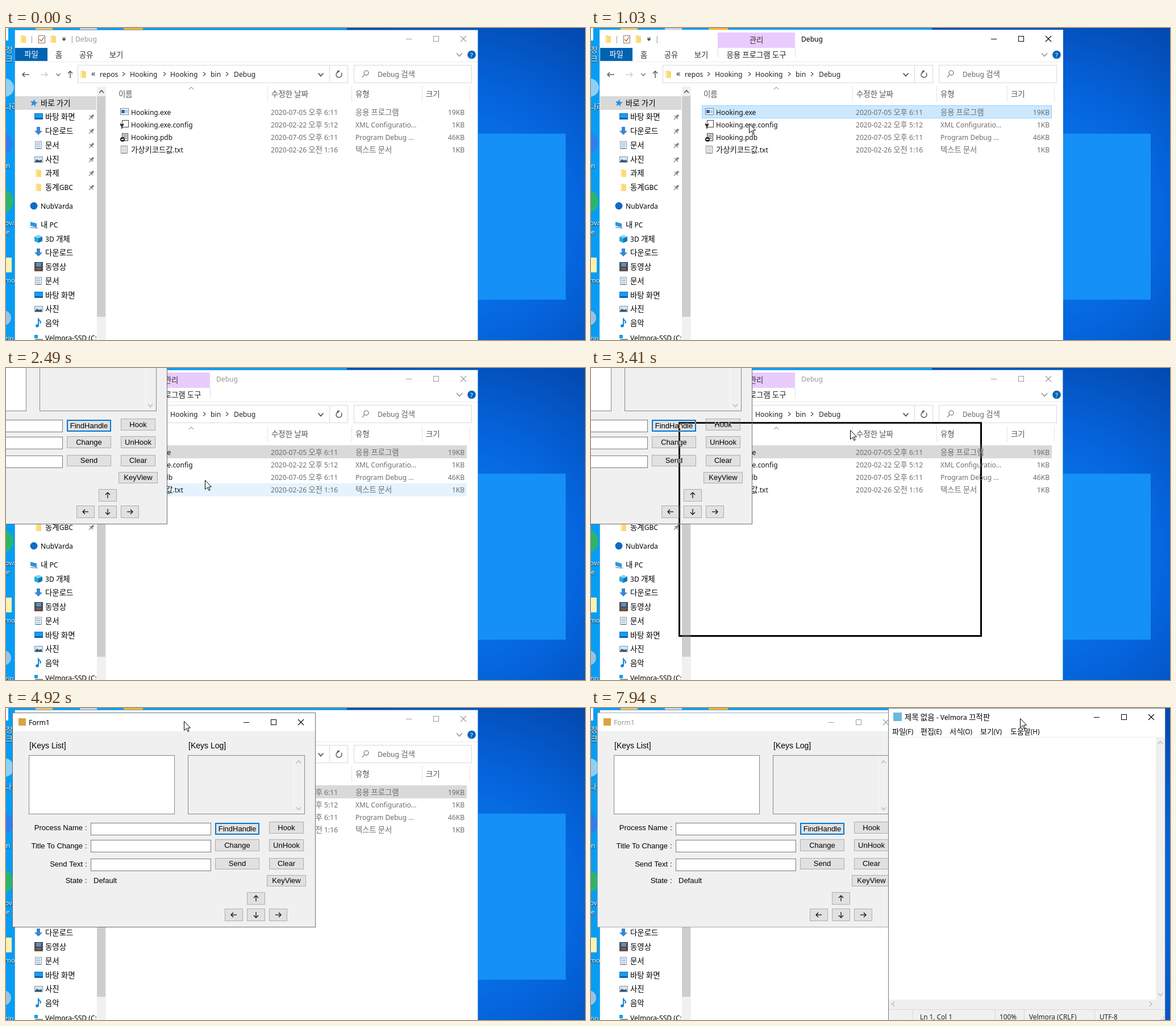
An HTML page with a canvas that plays this animation: 1019 by 549 pixels, repeating every 8000 ms.

```html
<!DOCTYPE html>
<html lang="ko">
<head>
<meta charset="utf-8">
<style>
html, body { margin: 0; width: 100%; height: 100%; overflow: hidden; background: #0467d8; }
canvas { display: block; }
</style>
</head>
<body>
<canvas id="stage" width="1019" height="549"></canvas>
<script>
const W = 1019, H = 549, LOOP = 8000;
const c = document.getElementById('stage').getContext('2d');
const UI = '"Noto Sans", "Open Sans", sans-serif';
const KO = '"Noto Sans CJK KR", "Noto Sans CJK", sans-serif';
const FORM = '"Liberation Sans", Arial, sans-serif';
const BLUE = '#0078d7';

// ---------- helpers ----------
function rect(x, y, w, h, fill) { c.fillStyle = fill; c.fillRect(x, y, w, h); }
function box(x, y, w, h, fill, edge, t = 1) {
  rect(x, y, w, h, edge);
  rect(x + t, y + t, w - 2 * t, h - 2 * t, fill);
}
function disc(x, y, r, fill) {
  c.fillStyle = fill; c.beginPath(); c.arc(x, y, r, 0, 7); c.fill();
}
function line(color, width, ...p) {
  c.strokeStyle = color; c.lineWidth = width; c.beginPath();
  for (let i = 0; i < p.length; i += 2) c.lineTo(p[i], p[i + 1]);
  c.stroke();
}
function poly(fill, ...p) {
  c.fillStyle = fill; c.beginPath();
  for (let i = 0; i < p.length; i += 2) c.lineTo(p[i], p[i + 1]);
  c.fill();
}
// Hangul runs are set a little larger than Latin ones; y is the optical middle.
function text(s, x, y, color = '#000', align = 0, size = 12.1) {
  const runs = s.split(/([\uac00-\ud7a3]+)/).filter(Boolean).map(r => {
    const font = /[\uac00-\ud7a3]/.test(r) ? `${size * 1.11}px ${KO}` : `${size}px ${UI}`;
    c.font = font;
    return { r, font, w: c.measureText(r).width };
  });
  x -= align * runs.reduce((a, b) => a + b.w, 0);
  c.fillStyle = color; c.textAlign = 'left';
  for (const { r, font, w } of runs) { c.font = font; c.fillText(r, x, y + 4.5); x += w; }
}
function label(s, x, y, align = 'left', size = 13) {
  c.font = `${size}px ${FORM}`; c.fillStyle = '#000'; c.textAlign = align;
  c.fillText(s, x, y + 4.5);
}
function chevron(x, y, dir, color = '#555', r = 4, w = 1.3) {
  const h = r * .55, q = { u: [-r, h, 0, -h, r, h], d: [-r, -h, 0, h, r, -h],
    l: [h, -r, -h, 0, h, r], r: [-h, -r, h, 0, -h, r] }[dir];
  line(color, w, ...q.map((v, i) => v + (i % 2 ? y : x)));
}
function arrow(x, y, dir, color, r = 6, w = 1.3) {
  const a = { r: 0, d: 1, l: 2, u: 3 }[dir] * Math.PI / 2;
  c.save(); c.translate(x, y); c.rotate(a);
  line(color, w, -r, 0, r, 0);
  line(color, w, r - 4, -4, r, 0, r - 4, 4);
  c.restore();
}
function frameButtons(x, y, gap, color) {
  rect(x - 5, y, 10, 1, color);
  c.strokeStyle = color; c.lineWidth = 1;
  c.strokeRect(x + gap - 4.5, y - 4.5, 9, 9);
  const k = x + 2 * gap;
  line(color, 1.1, k - 5, y - 5, k + 5, y + 5);
  line(color, 1.1, k + 5, y - 5, k - 5, y + 5);
}
// Linear motion through [time, x, y] points.
function along(t, pts) {
  if (t <= pts[0][0]) return pts[0].slice(1);
  for (let i = 1; i < pts.length; i++) {
    const [t0, x0, y0] = pts[i - 1], [t1, x1, y1] = pts[i];
    if (t < t1) {
      const k = (t - t0) / (t1 - t0);
      return [x0 + (x1 - x0) * k, y0 + (y1 - y0) * k];
    }
  }
  return pts[pts.length - 1].slice(1);
}
const clamp = v => Math.max(0, Math.min(1, v));

// ---------- icons, each about 15 px around its middle ----------
const icon = {
  folder(x, y) {
    rect(x - 5, y - 6, 5, 12, '#f0c24f'); rect(x - 4, y - 5, 9, 12, '#fbd978');
    rect(x - 5, y - 6, 3, 13, '#ffe9a6');
  },
  star(x, y) {
    const p = [];
    for (let i = 0; i < 10; i++) {
      const r = i % 2 ? 3 : 7, a = i * Math.PI / 5 - 1.4;
      p.push(x + r * Math.cos(a), y + r * Math.sin(a));
    }
    poly('#2a8fe0', ...p);
  },
  desk(x, y) {
    box(x - 7, y - 6, 15, 11, '#1c9cf0', '#0f6fc0'); rect(x - 6, y + 2, 13, 2, '#0b5ea8');
  },
  down(x, y) {
    poly('#3a86d0', x - 3, y - 7, x + 3, y - 7, x + 3, y, x + 7, y, x, y + 7, x - 7, y, x - 3, y);
  },
  doc(x, y) {
    box(x - 6, y - 7, 12, 14, '#fff', '#8b98a5');
    for (let i = 0; i < 4; i++) rect(x - 4, y - 4 + 3 * i, 8, 1, i < 2 ? '#3f8fd0' : '#7e8f9e');
  },
  photo(x, y) {
    box(x - 7, y - 5, 15, 11, '#cfe6f7', '#8b98a5');
    poly('#35566e', x - 6, y + 4, x - 3, y, x + 1, y + 2, x + 6, y + 1, x + 6, y + 5, x - 6, y + 5);
  },
  cube(x, y) {
    poly('#7fd6f2', x, y - 7, x + 7, y - 4, x, y - 1, x - 7, y - 4);
    poly('#22a7dd', x - 7, y - 4, x, y - 1, x, y + 7, x - 7, y + 4);
    poly('#0f78b5', x + 7, y - 4, x, y - 1, x, y + 7, x + 7, y + 4);
  },
  film(x, y) {
    rect(x - 7, y - 8, 15, 16, '#333'); rect(x - 4, y - 7, 9, 7, '#5a8fc4'); rect(x - 4, y + 1, 9, 6, '#7a5a50');
    for (let i = 0; i < 5; i++) { rect(x - 6, y - 6 + 3 * i, 1, 1, '#fff'); rect(x + 6, y - 6 + 3 * i, 1, 1, '#fff'); }
  },
  note(x, y) {
    line('#1687d9', 2, x, y + 5, x, y - 7, x + 4, y - 2, x + 3, y + 1);
    disc(x - 2, y + 5, 2.8, '#1687d9');
  },
  pc(x, y) {
    poly('#2d95dc', x - 6, y - 5, x + 5, y - 2, x + 5, y + 5, x - 6, y + 2);
    line('#8a9aa8', 1.5, x - 6, y + 5, x + 7, y + 6);
  },
  drive(x, y) { rect(x - 7, y - 5, 6, 6, '#12a0ea'); rect(x - 6, y + 2, 14, 4, '#8b949c'); },
  cloud(x, y) { disc(x, y, 6.5, '#0f6cc4'); }
};
function pin(x, y) {
  line('#7d868e', 3.5, x - 1, y + 1, x + 3, y - 3);
  line('#7d868e', 1.2, x - 4, y - 2, x + 2, y + 4);
  line('#7d868e', 1.2, x - 5, y + 5, x, y);
}

// ---------- desktop ----------
function desktop() {
  rect(0, 0, W, H, '#079df4');
  const g = c.createRadialGradient(800, 330, 40, 800, 330, 400);
  g.addColorStop(0, '#0a7cf0'); g.addColorStop(.5, '#0564dc'); g.addColorStop(1, '#0347ac');
  rect(600, 0, W - 600, H, g);
  rect(693, 186, 292, 292, '#1590f6');
  rect(0, 0, 4, 22, '#fff');
  disc(-2, 105, 16, '#8fd0f5');
  disc(-8, 203, 20, '#2f7ff0');
  disc(-8, 305, 21, '#2cb56a');
  rect(0, 404, 10, 26, '#fff1b0');
  disc(-4, 510, 13, '#9cc3dd');
  [['장', 38], ['크', 54], ['나리', 138], ['n', 241], ['ova', 342], ['e', 358], ['mo_', 443], ['zip', 545]]
    .forEach(([s, y], i) => {
      c.shadowColor = '#000'; c.shadowBlur = 2; c.shadowOffsetY = 1;
      text(s, i === 2 || i === 4 || i > 5 ? -2 : 0, y, '#fff', 0, 11.5);
      c.shadowColor = 'transparent';
    });
  rect(52, 0, 30, 4, '#e8c56a'); rect(130, 0, 30, 4, '#c9d3da'); rect(207, 0, 34, 4, '#efb62f');
}

// ---------- file browser ----------
const NAV = [
  ['star', '바로 가기', 132, 0], ['desk', '바탕 화면', 156, 2], ['down', '다운로드', 181, 2],
  ['doc', '문서', 206, 2], ['photo', '사진', 231, 2], ['folder', '과제', 255, 2], ['folder', '동계GBC', 280, 2],
  ['cloud', 'NubVarda', 313, 0], ['pc', '내 PC', 346, 0], ['cube', '3D 개체', 371, 1],
  ['down', '다운로드', 395, 1], ['film', '동영상', 420, 1], ['doc', '문서', 445, 1],
  ['desk', '바탕 화면', 470, 1], ['photo', '사진', 494, 1], ['note', '음악', 519, 1], ['drive', 'Velmora-SSD (C:)', 545, 1]
];
const FILES = [
  ['Hooking.exe', '2020-07-05 오후 6:11', '응용 프로그램', '19KB'],
  ['Hooking.exe.config', '2020-02-22 오후 5:12', 'XML Configuratio...', '1KB'],
  ['Hooking.pdb', '2020-07-05 오후 6:11', 'Program Debug ...', '46KB'],
  ['가상키코드값.txt', '2020-02-26 오전 1:16', '텍스트 문서', '1KB']
];
const rowTop = i => Math.round(136 + 22.4 * i);

function fileIcon(i, x, y) {
  if (i === 0) {
    box(x - 7, y - 6, 15, 12, '#fff', '#6f7f8c'); rect(x - 5, y - 3, 6, 6, '#1d6fc4'); rect(x + 2, y - 3, 4, 6, '#b9c8d5');
  } else if (i === 1) {
    box(x - 4, y - 7, 12, 13, '#fff', '#444');
    disc(x - 4, y + 1, 3, '#333'); rect(x - 5, y + 2, 2, 6, '#333'); rect(x - 5, y - 2, 2, 2, '#fff');
  } else if (i === 2) {
    box(x - 4, y - 7, 11, 14, '#e8e8e8', '#444');
    for (let k = 0; k < 3; k++) rect(x - 2, y - 4 + 3 * k, 7, 1, '#555');
    disc(x - 3, y + 4, 4, '#222'); rect(x - 5, y + 3, 4, 2, '#fff');
  } else {
    box(x - 6, y - 7, 12, 14, '#fff', '#8a8a8a');
    for (let k = 0; k < 5; k++) rect(x - 4, y - 5 + 2.5 * k, 8, 1, '#aaa');
  }
}

function browser(active, picked, hover) {
  box(15, 3, 816, 560, '#fff', active ? '#e8eef4' : '#5fa6da');
  const ink = active ? '#000' : '#999';
  icon.folder(30, 19);
  text('|', 42, 19, '#888'); text('|', 113, 19, '#888');
  box(57, 13, 12, 14, '#fff', '#777'); line('#d5762a', 1.6, 59, 20, 62, 23, 67, 16);
  icon.folder(83, 19);
  rect(99, 17, 6, 1, '#333'); poly('#333', 98.5, 19, 105.5, 19, 102, 23);
  if (picked) {
    rect(223, 8, 136, 27, '#e9cbfd');
    text('관리', 291, 21, '#333', .5);
    text('응용 프로그램 도구', 291, 47, '#222', .5);
    rect(223, 35, 1, 18, '#e0e0e0'); rect(359, 35, 1, 18, '#e0e0e0');
  }
  text('Debug', picked ? 370 : 122, 19, ink);
  frameButtons(709, 19, 48, ink);

  rect(16, 35, 57, 23, '#0063b1');
  text('파일', 44.5, 46, '#fff', .5);
  [['홈', 93], ['공유', 141], ['보기', 194]].forEach(([s, x]) => text(s, x, 47, '#333', .5));
  chevron(798, 47, 'd', '#888', 5);
  disc(819.5, 47, 7.3, '#0064b8'); text('?', 819.5, 47, '#fff', .5, 11);
  rect(16, 59, 814, 1, '#ececec');

  arrow(35, 82, 'l', '#444'); arrow(67, 82, 'r', '#c8c8c8');
  chevron(92, 82, 'd', '#666', 3.5); arrow(113, 82, 'u', '#444');
  box(126, 65, 476, 32, '#fff', '#d9d9d9'); rect(569, 65, 1, 32, '#d9d9d9');
  icon.folder(136, 81);
  text('«', 150, 80, '#222', 0, 14);
  [['repos', 165, 207], ['Hooking', 218, 279], ['Hooking', 289, 349], ['bin', 360, 389], ['Debug', 401]]
    .forEach(([s, x, next]) => { text(s, x, 81, '#222', 0, 12.2); if (next) chevron(next, 81, 'r', '#555', 3.5); });
  chevron(554, 82, 'd', '#444', 4.5, 1.6);
  c.strokeStyle = '#555'; c.lineWidth = 1.4;
  c.beginPath(); c.arc(586, 82, 5, -.7, 4.2); c.stroke();
  poly('#555', 583, 75, 588, 75, 583, 80);
  box(612, 65, 208, 32, '#fff', '#d9d9d9');
  c.strokeStyle = '#666'; c.lineWidth = 1.1;
  c.beginPath(); c.arc(634, 79, 4, 0, 7); c.stroke();
  line('#666', 1.2, 631, 82, 627, 87);
  text('Debug 검색', 654, 81, '#666');

  rect(16, 120, 143, 24, '#d9d9d9');
  c.save(); c.beginPath(); c.rect(16, 100, 143, 449); c.clip();
  for (const [name, s, y, level] of NAV) {
    icon[name](level ? 57 : 49, y);
    text(s, level ? 69 : 61, y, '#000');
    if (level === 2) pin(151, y);
  }
  c.restore();
  rect(160, 103, 16, 446, '#f0f0f0'); rect(160, 120, 15, 388, '#cdcdcd');
  chevron(168, 112, 'u', '#555', 4, 1.6);

  [['이름', 198], ['수정한 날짜', 467], ['유형', 615], ['크기', 739]].forEach(([s, x]) => text(s, x, 116, '#555'));
  chevron(326, 106, 'u', '#777', 4, 1);
  [460, 608, 732, 815].forEach(x => rect(x, 102, 1, 28, '#e5e5e5'));
  if (hover >= 0) rect(195, rowTop(hover), 616, 23, '#e5f3ff');
  if (picked) {
    if (active) box(195, 136, 616, 23, '#cce8ff', '#99d1ff');
    else rect(195, 136, 616, 23, '#d9d9d9');
  }
  FILES.forEach(([name, date, kind, size], i) => {
    const y = 148 + 22.3 * i;
    fileIcon(i, 208, Math.round(y) - 1);
    text(name, 220, y, '#111', 0, 12);
    text(date, 466, y, '#6d6d6d');
    text(kind, 615, y, '#6d6d6d', 0, 12);
    text(size, 807, y, '#6d6d6d', 1);
  });
}

// ---------- form ----------
const HOME = [11, 8], SIZE = [534, 378];
function button(s, x, y, w, h, focus) {
  box(x, y, w, h, '#e1e1e1', focus ? BLUE : '#adadad', focus ? 2 : 1);
  const dir = { '↑': 'u', '↓': 'd', '←': 'l', '→': 'r' }[s];
  if (dir) arrow(x + w / 2, y + h / 2, dir, '#000', 5, 1.2);
  else label(s, x + w / 2, y + h / 2 - .5, 'center');
}
function form([x, y], active) {
  c.save();
  c.translate(x - HOME[0], y - HOME[1]);
  box(...HOME, ...SIZE, '#f0f0f0', active ? '#707070' : '#aaa');
  rect(12, 9, 532, 32, '#fff');
  rect(22, 18, 13, 13, '#d9a441');
  const ink = active ? '#000' : '#999';
  text('Form1', 40, 25, ink);
  frameButtons(423, 25, 48, ink);
  label('[Keys List]', 41, 66, 'left', 14); label('[Keys Log]', 321, 66, 'left', 14);
  box(40, 83, 257, 104, '#fff', '#828790');
  box(320, 83, 206, 104, '#f0f0f0', '#828790');
  rect(506, 84, 1, 102, '#fafafa');
  chevron(515, 95, 'u', '#bcbcbc', 4, 1.6); chevron(515, 177, 'd', '#bcbcbc', 4, 1.6);
  [['Process Name', 210], ['Title To Change', 242], ['Send Text', 274], ['State', 303]].forEach(([s, ly]) => {
    label(s, 135, ly, 'right'); label(':', 139, ly);
  });
  label('Default', 154, 303);
  [202, 232, 265].forEach(iy => box(149, iy, 212, 22, '#fff', '#7a7a7a'));
  button('FindHandle', 368, 202, 78, 21, true);
  button('Change', 368, 231, 78, 21); button('Send', 368, 264, 78, 20);
  button('Hook', 463, 200, 61, 21); button('UnHook', 463, 231, 61, 21);
  button('Clear', 463, 264, 61, 20); button('KeyView', 459, 294, 69, 20);
  button('↑', 424, 324, 32, 22); button('←', 385, 353, 32, 22);
  button('↓', 424, 353, 32, 22); button('→', 463, 353, 32, 22);
  c.restore();
}

// ---------- text editor ----------
function editor([x, y], caret) {
  c.save();
  c.translate(x - 523, y);
  box(523, 0, 488, 600, '#fff', '#6f7d8a');
  rect(532, 8, 15, 15, '#6cb8dc');
  text('제목 없음 - Velmora 끄적판', 552, 16);
  frameButtons(890, 16, 48, '#000');
  [['파일(F)', 530], ['편집(E)', 580], ['서식(O)', 631], ['보기(V)', 685], ['도움말(H)', 738]]
    .forEach(([s, mx]) => text(s, mx, 41, '#000', 0, 11.7));
  rect(524, 51, 486, 1, '#f0f0f0');
  rect(994, 52, 16, 462, '#f0f0f0'); rect(524, 513, 486, 18, '#f0f0f0');
  chevron(1002, 61, 'u', '#bcbcbc', 4, 1.6); chevron(1002, 504, 'd', '#bcbcbc', 4, 1.6);
  chevron(532, 521, 'l', '#bcbcbc', 4, 1.6); chevron(985, 521, 'r', '#bcbcbc', 4, 1.6);
  rect(524, 530, 486, 69, '#f0f0f0'); rect(524, 530, 486, 1, '#d7d7d7');
  [566, 711, 762, 886].forEach(sx => rect(sx, 531, 1, 22, '#d7d7d7'));
  [['Ln 1, Col 1', 579], ['100%', 719], ['Velmora (CRLF)', 771], ['UTF-8', 895]]
    .forEach(([s, sx]) => text(s, sx, 543, '#222', 0, 11.8));
  rect(1007, 543, 2, 2, '#bbb'); rect(1003, 547, 2, 2, '#bbb'); rect(1007, 547, 2, 2, '#bbb');
  if (caret) rect(528, 52, 1, 21, '#000');
  c.restore();
}

// ---------- drag outline and pointer ----------
function outline([x, y], w, h) {
  x = Math.round(x); y = Math.round(y);
  c.save(); c.globalCompositeOperation = 'difference';
  rect(x, y, w, 3, '#fff'); rect(x, y + h - 3, w, 3, '#fff');
  rect(x, y + 3, 3, h - 6, '#fff'); rect(x + w - 3, y + 3, 3, h - 6, '#fff');
  c.restore();
}
function pointer([x, y]) {
  c.save(); c.translate(Math.round(x) + .5, Math.round(y) + .5);
  poly('#fff', 0, 0, 0, 16, 4, 12.5, 6.5, 18, 8.7, 17, 6.2, 11.7, 11, 11.5);
  c.strokeStyle = '#000'; c.lineWidth = 1; c.closePath(); c.stroke();
  c.restore();
}

const POINTER = [
  [70, 640, 549], [300, 470, 420], [700, 225, 149], [970, 225, 149], [1030, 278, 167], [1630, 507, 549],
  [2149, 460, 560], [2150, 460, 549], [2490, 351, 198], [2690, 200, -20], [3180, 52, -88],
  [3410, 456, 109], [3480, 450, 108], [3760, 450, 108], [3790, 434, 98], [4170, 359, 48], [4560, 306, 21],
  [4680, 306, 21], [4920, 313, 23], [6600, 313, 23], [6700, 768, 172], [6870, 768, 172],
  [7000, 781, 80], [7140, 764, 13], [7290, 764, 13], [7700, 755, 18]
];
const DRAG1 = [[3180, -250, -103], [3410, 154, 95]];
const DRAG2 = [[3760, 154, 95], [3790, 139, 85], [4170, 64, 35], [4560, 11, 8]];
const DRAG3 = [[7290, 532, -5], [7700, 523, 0]];

function hoverRow(t) {
  if (!(t < 740 || (t > 2150 && t < 2720))) return -1;
  const [x, y] = along(t - 20, POINTER);
  const row = Math.floor((y - 136) / 22.4);
  return x > 195 && x < 811 && row >= 0 && row < 4 ? row : -1;
}

function draw(t) {
  desktop();
  browser(t >= 740 && t < 1910, t >= 740, hoverRow(t));

  if (t >= 1910) {
    const pos = t < 3480 ? [-250, -103] : t < 4680 ? [154, 95] : HOME;
    c.globalAlpha = clamp((t - 1880) / 150);
    form(pos, t < 5510);
    c.globalAlpha = 1;
  }
  if (t >= 6220) {
    const k = clamp((t - 6190) / 200), s = .92 + .08 * k;
    const caret = t < 7940 && Math.floor((7940 - t) / 530) % 2 === 0;
    c.save();
    c.globalAlpha = k;
    c.translate(767, 295); c.scale(s, s); c.translate(-767, -295);
    editor(t < 7700 ? [532, -5] : [523, 0], caret);
    c.restore();
  }
  if (t >= 3180 && t < 3480) outline(along(t, DRAG1), ...SIZE);
  if (t >= 3790 && t < 4680) outline(along(t, DRAG2), ...SIZE);
  if (t >= 7300 && t < 7700) outline(along(t, DRAG3), 488, 600);
  pointer(along(t, POINTER));
}

const start = performance.now();
function tick() {
  draw((performance.now() - start) % LOOP);
  requestAnimationFrame(tick);
}
tick();
</script>
</body>
</html>
```
